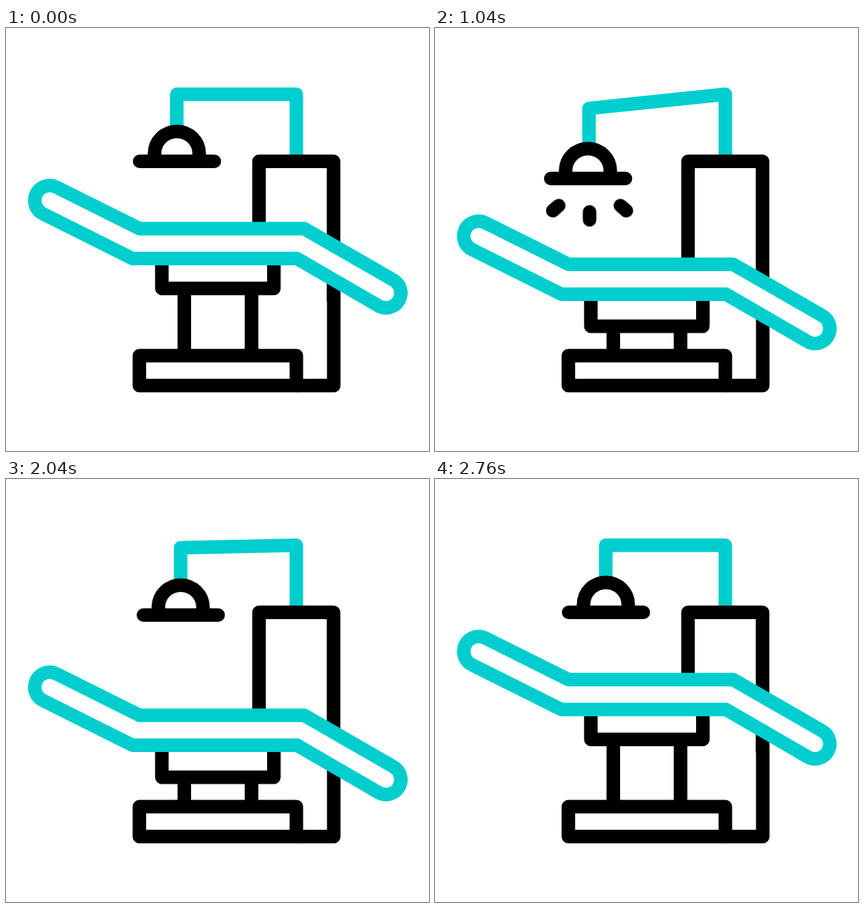
Write an HTML page without scripts that moves like this. It is 640 px wide and 640 px high and loops after 3.08 s.

```html
<!DOCTYPE html>
<html lang="en">
<head>
<meta charset="utf-8">
<title>Dental chair</title>
<style>
  html, body { margin: 0; width: 100%; height: 100%; overflow: hidden; background: #fff; }
  svg { display: block; width: 100%; height: 100%; }
  path { fill: none; stroke: #000; stroke-width: 20.5; stroke-linejoin: round; }
  .teal { stroke: #00cece; }
  .round { stroke-linecap: round; }
  .solid { fill: #fff; }

  .arm, .lamp, .glow, .couch, .seat {
    animation: 3080ms cubic-bezier(.25, .13, .52, 1) infinite;
  }
  .couch { --drop: 54px; animation-name: lower; }
  .seat { --drop: 57.3px; animation-name: lower; }
  .lamp { animation-name: swing; }
  .glow { animation-name: lead; }
  .arm { animation-name: bend; }

  /* Rays leave the lamp: the head runs first, the tail follows. */
  .ray {
    opacity: 0;
    animation: shoot 3080ms linear var(--at) infinite, show 3080ms linear var(--at) infinite;
  }

  @keyframes lower {
    0%, 66.234%, 89.61%, 100% { transform: none; }
    19.481%, 66.234% { transform: translateY(var(--drop)); }
  }
  @keyframes swing {
    0%, 11.688%, 72.727%, 100% { transform: translate(0, 0); }
    30.519% { transform: translate(-41.3px, 24.4px); }
    51.299% { transform: translate(47.8px, 34.1px); }
  }
  @keyframes lead {
    0%, 9.416%, 72.727%, 100% { transform: translate(0, 0); }
    30.195% { transform: translate(-41.3px, 24.4px); }
    50.649% { transform: translate(47.8px, 34.1px); }
  }
  @keyframes bend {
    0%, 11.688%, 72.727%, 100% { d: path("M439.3 201 L439.3 100.2 L258.4 100.2 L258.4 158"); }
    30.519% { d: path("M439.3 201 L439.3 100.2 L219 119.7 L219 182.4"); }
    51.299% { d: path("M439.3 201 L439.3 100.2 L307.2 131.8 L307.2 192"); }
  }
  @keyframes shoot {
    0% { stroke-dasharray: 0 99; stroke-dashoffset: 0; }
    3.896% { stroke-dasharray: 12 99; stroke-dashoffset: 0; }
    12.338% { stroke-dasharray: 12 99; stroke-dashoffset: -26; }
    16.234%, 100% { stroke-dasharray: 0 99; stroke-dashoffset: -38; }
  }
  @keyframes show {
    0%, .6% { opacity: 0; }
    .61%, 16.1% { opacity: 1; }
    16.11%, 100% { opacity: 0; }
  }
</style>
</head>
<body>
<svg viewBox="0 0 640 640">
  <defs>
    <path id="rays" class="round" d="M258.7 228v38M230.2 226.5l-28.5 25M287.2 226.5l28.5 25"/>
  </defs>

  <path class="teal arm" d="M439.3 201 L439.3 100.2 L258.4 100.2 L258.4 158"/>

  <g class="glow">
    <use href="#rays" class="ray" style="--at: 80ms"/>
    <use href="#rays" class="ray" style="--at: 680ms"/>
    <use href="#rays" class="ray" style="--at: 1280ms"/>
  </g>

  <g class="lamp">
    <path class="round" d="M202.2 201.7H315.2"/>
    <path d="M224.7 201v-10.8a33.8 33.8 0 0 1 67.6 0v10.8"/>
  </g>

  <!-- tower, columns and base -->
  <path d="M382.8 350V201.7H495.6V414"/>
  <path d="M495.9 400V541H439.3"/>
  <path d="M269.8 394V496M371.5 394V496"/>
  <path d="M201.8 495.8H439.3V541H201.8Z"/>

  <path class="solid seat" d="M235.8 345V394H405.3V345"/>
  <path class="teal solid couch" d="M76 240.7L202 303.5H451L586.2 381.3A22.5 22.5 0 0 1 563.7 420.3L440 348.7H191L56 281.1A22.5 22.5 0 0 1 76 240.7Z"/>
</svg>
</body>
</html>
```
